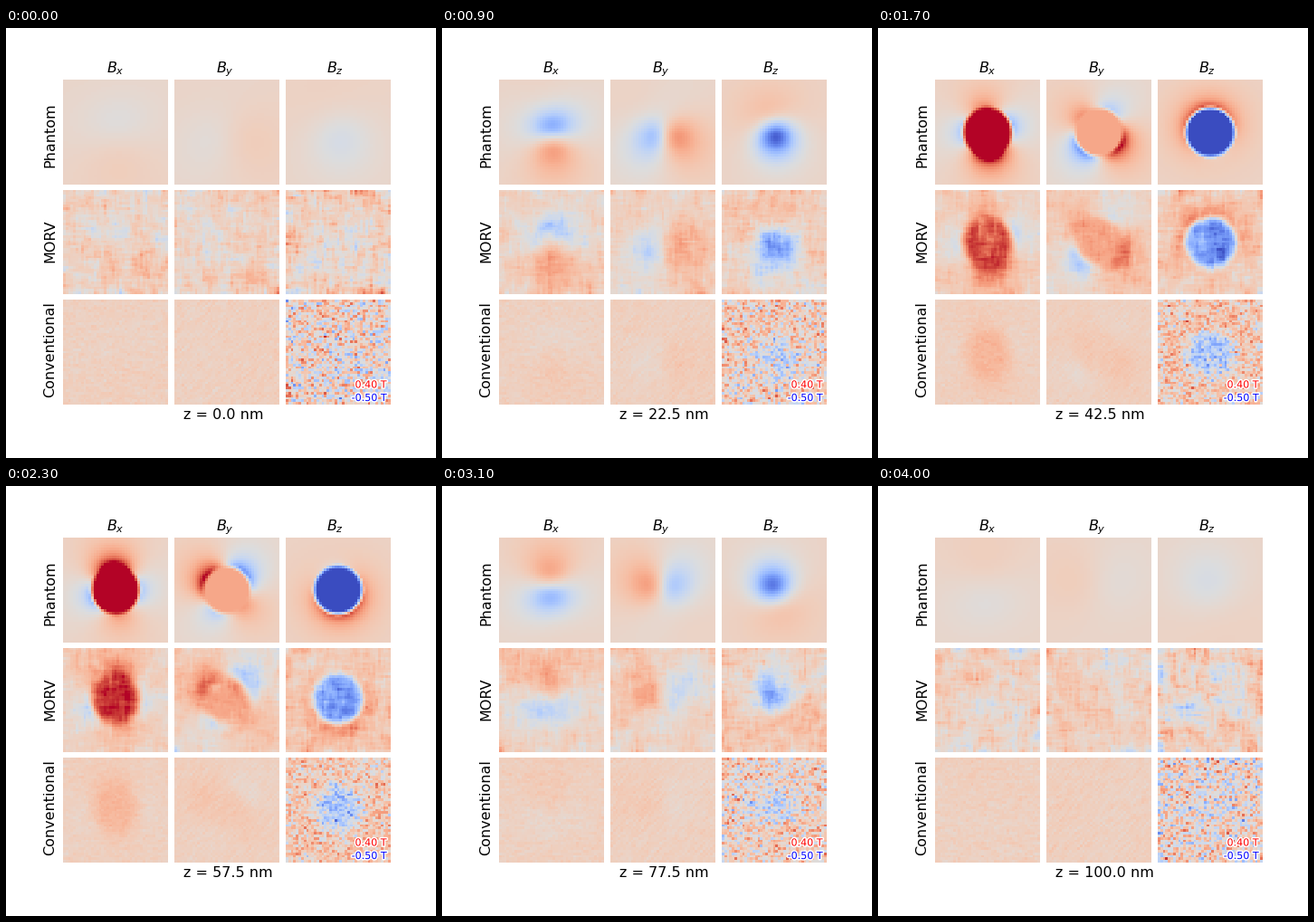
Write a matplotlib script that moves like this. It is 475 px wide and 475 px high and loops after 4.1 s.

```python
import numpy as np
import matplotlib.pyplot as plt
from matplotlib.animation import FuncAnimation
from matplotlib.patheffects import withStroke

SIZE = 475          # stage, px
N = 41              # voxels per axis, also the number of slices
STEP = 2.5          # nm per voxel
RADIUS = 24.7       # nm
CENTRE_Z = 49.4     # nm
B_IN = np.array([0.48, 0.14, -0.52])   # field inside the sphere, T
VMIN, VMAX = -0.5, 0.4

rng = np.random.default_rng(12)


def sphere_field():
    """Field of a uniformly magnetised sphere, as [component, z, x, y]."""
    c = (np.arange(N) - N // 2) * STEP
    z, x, y = np.meshgrid(np.arange(N) * STEP - CENTRE_Z, c, c, indexing="ij")
    pos = np.stack([x, y, z])
    r = np.sqrt((pos ** 2).sum(0))
    unit = pos / r
    b = B_IN[:, None, None, None]
    falloff = (RADIUS / np.maximum(r, RADIUS)) ** 3
    dipole = 0.5 * falloff * (3 * (b * unit).sum(0) * unit - b)
    inside = np.clip((RADIUS - r) / (1.8 * STEP) + 0.5, 0, 1)
    return inside * b + (1 - inside) * dipole


def box(a, width, axis):
    """Running mean along one axis, edges repeated."""
    half = width // 2
    pad = [(0, 0)] * a.ndim
    pad[axis] = (half, width - 1 - half)
    p = np.pad(a, pad, mode="edge")
    return sum(np.take(p, np.arange(k, k + a.shape[axis]), axis)
               for k in range(width)) / width


def blur(a, *widths):
    """Box blur along z, x and y."""
    for axis, width in enumerate(widths):
        if width > 1:
            a = box(a, width, axis)
    return a


def noise(*widths):
    """Seeded noise of unit spread, blurred along z, x and y."""
    n = blur(rng.standard_normal((N, N, N)), *widths)
    return n / n.std()


def blocky_noise():
    n = (0.8 * noise(3, 5, 1) + 0.8 * noise(3, 1, 5) + noise(3, 4, 3)
         + 1.3 * noise(5, 9, 7))
    n = np.sign(n) * np.abs(n) ** 1.2
    return n / n.std()


# distance from the middle slice, 0 to 1
depth = np.abs(np.linspace(-1, 1, N))[:, None, None]


def regularised(b, spread):
    soft = blur(blur(b, 3, 3, 3), 3, 3, 3)
    signal = 0.45 * np.tanh(2 * soft)
    sigma = spread * (0.85 + 0.25 * depth) * (1 + 2 * np.abs(signal))
    return signal + 0.02 + sigma * blocky_noise()


def conventional(b, k):
    soft = blur(blur(b, 5, 5, 5), 3, 5, 5)
    if k == 2:
        grain = (noise(1, 1, 1) + 0.8 * noise(1, 1, 2)) / 1.28
        return (0.42 * soft + 0.03 * (1 - depth)
                + (0.075 + 0.04 * depth) * grain)
    if k == 0:
        grain = (noise(1, 1, 1) + noise(1, 1, 3)) / 1.41
    else:
        n = noise(1, 1, 1)
        grain = (n + 0.7 * np.roll(n, (1, -1), (1, 2))) / 1.22
    return 0.17 * soft + 0.02 + (0.01 + 0.003 * depth) * grain


field = sphere_field()
volumes = [
    list(field),
    [regularised(b, s) for b, s in zip(field, (0.025, 0.025, 0.036))],
    [conventional(b, k) for k, b in enumerate(field)],
]

fig = plt.figure(figsize=(SIZE / 100, SIZE / 100), dpi=100, facecolor="white")


def label(x, y, s, px=16, **kw):
    """Text placed in pixels from the top left."""
    return fig.text(x / SIZE, 1 - y / SIZE, s, fontsize=px * 0.72,
                    family="DejaVu Sans", **kw)


PANEL = 116
images = []
for row, top in enumerate((57, 178.5, 300)):
    for col, left in enumerate((63, 186, 309)):
        ax = fig.add_axes([left / SIZE, 1 - (top + PANEL) / SIZE,
                           PANEL / SIZE, PANEL / SIZE])
        ax.axis("off")
        im = ax.imshow(volumes[row][col][0], cmap="coolwarm", vmin=VMIN,
                       vmax=VMAX, interpolation="nearest", aspect="auto")
        images.append((im, volumes[row][col]))

for x, name in zip((121, 242, 363.5), "xyz"):
    label(x, 49, f"$B_{name}$", ha="center", va="baseline")
for y, name in zip((118, 235.5, 355), ("Phantom", "MORV", "Conventional")):
    label(49, y, name, rotation=90, ha="center", va="center")

halo = [withStroke(linewidth=2.2, foreground="white")]
for y, value, color in ((397.5, VMAX, "red"), (412, VMIN, "blue")):
    label(420.5, y, f"{value:.2f} T", px=11.1, color=color, ha="right",
          va="baseline", path_effects=halo)
caption = label(195.5, 432, "", ha="left", va="baseline")


def draw(i):
    for im, volume in images:
        im.set_data(volume[i])
    caption.set_text(f"z = {i * STEP:.1f} nm")
    return [im for im, _ in images] + [caption]


anim = FuncAnimation(fig, draw, frames=N, interval=100, repeat=True)
plt.show()
```
